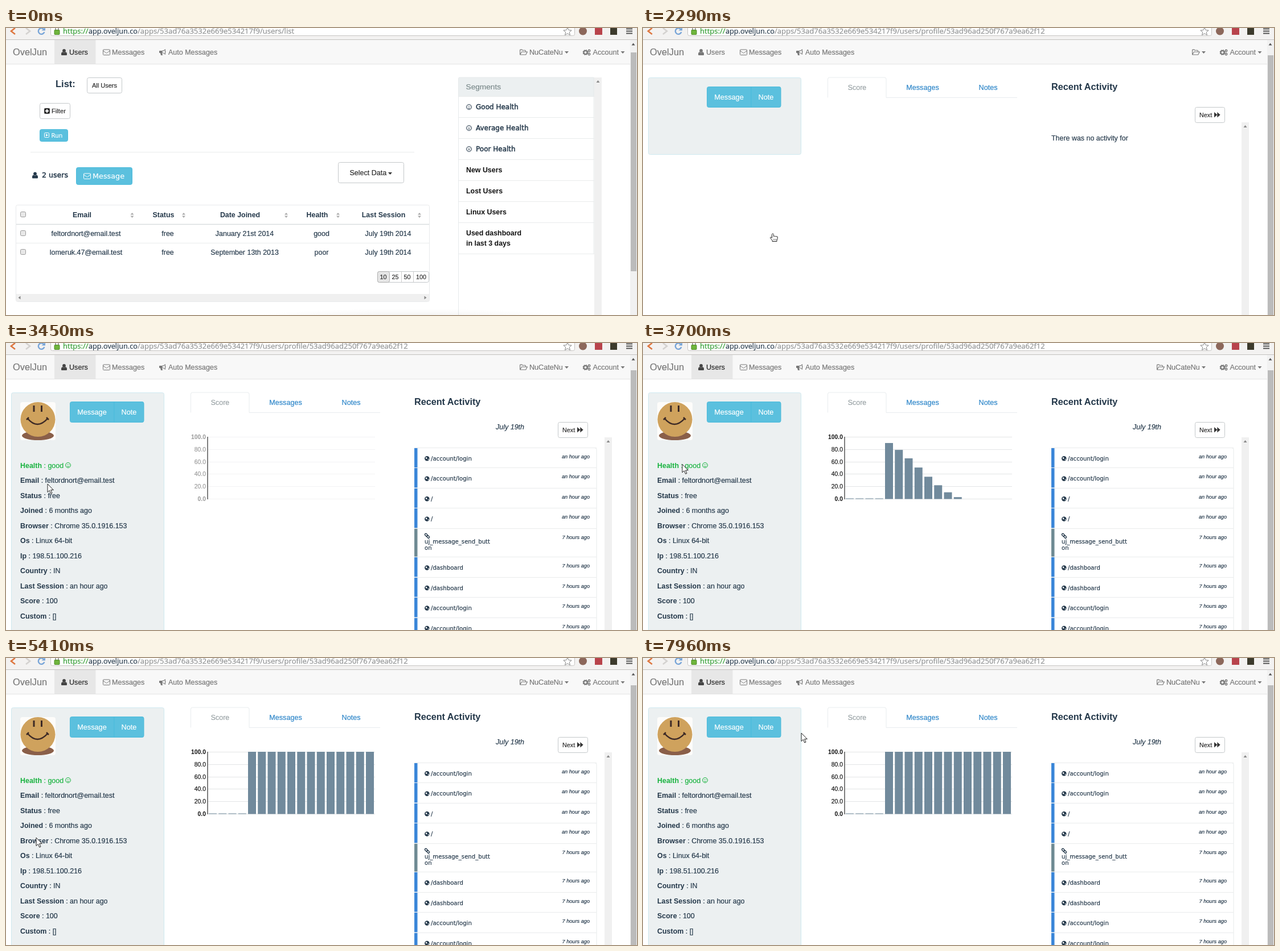
Recreate the animation shown at these times as an HTML page. Size 1108x505 px, loop 8 s.

```html
<!DOCTYPE html>
<html lang="en">
<head>
<meta charset="utf-8">
<title>User profile walkthrough</title>
<style>
html, body { margin: 0; width: 100%; height: 100%; overflow: hidden; background: #fff; }
svg { display: block; width: 100%; height: 100%; }
text { font-family: "Liberation Sans", Arial, sans-serif; white-space: pre;
  color: #24384a; fill: currentColor; stroke: currentColor; stroke-width: .18px; }
.d { font-family: "DejaVu Sans", sans-serif; }
.u { font-family: "Open Sans", sans-serif; }
.b { font-weight: bold; stroke-width: 0; }
.h { stroke-width: .45px; }
.i { font-style: italic; }
.m { text-anchor: middle; }
.e { text-anchor: end; }
.nav { color: #777; }
.dark { color: #2b2b2b; }
.black { color: #111; }
.white { color: #fff; }
.blue { color: #2a84c8; }
.pale { color: #98a1a4; }
.slate { color: #7b8a8b; }
.grey { color: #8e9091; }
.green { color: #18b33f; }
.lock { color: #2d9a2d; }
</style>
</head>
<body>
<svg id="stage" viewBox="0 0 1108 505"></svg>
<script>
const LOOP = 8000;
const ink = '#24384a', cyan = '#5bc0de', cyanEdge = '#4cbbdb', blue = '#3a86d8';

// Drawing helpers
const text = (x, y, s, cls = '', size = 12.45) =>
  `<text x="${x}" y="${y}" class="${cls}" style="font-size:${size}px">${s}</text>`;
const rect = (x, y, w, h, fill, stroke = 'none', r = 0) =>
  `<rect x="${x}" y="${y}" width="${w}" height="${h}" rx="${r}" fill="${fill}" stroke="${stroke}"/>`;
const path = (d, fill = 'none', stroke = 'none', w = 1) =>
  `<path d="${d}" fill="${fill}" stroke="${stroke}" stroke-width="${w}"/>`;
const hline = (x, y, x2, c = '#e9ebec') => path(`M${x} ${y}H${x2}`, 'none', c);
const at = (x, y, s) => `<g transform="translate(${x} ${y})">${s}</g>`;
const group = (id, s) => `<g id="${id}">${s}</g>`;
const button = (x, y, w, h, fill = '#fff', edge = '#c4c8ca') => rect(x + .5, y + .5, w, h, fill, edge, 3);
const range = (n, f) => Array.from({ length: n }, (_, i) => f(i)).join('');

// Icons, placed by their top left corner
const icon = {
  user: (x, y, c) => at(x, y, `<circle cx="5" cy="3" r="2.9" fill="${c}"/>` +
    path('M0 11V8.5Q0 5.5 2.5 5.3Q5 7 7.5 5.3Q10 5.5 10 8.5V10Q10 11 9 11H1Q0 11 0 10Z', c)),
  mail: (x, y, c) => at(x, y, rect(.5, .5, 12, 9.5, 'none', c, 1) + path('M.7 2.5L5.5 6.2Q6.5 7 7.5 6.2L12.3 2.5', 'none', c)),
  horn: (x, y, c) => at(x, y, path('M0 4Q0 3 1 3H5Q8 3 11 0V10Q8 7 5 7L6 11H3L2 7H1Q0 7 0 6ZM11.5 4q1.5 1 0 2z', c) +
    path('M5.5 4Q8 4 10 2V8Q8 6.3 5.5 6Z', '#f8f8f8')),
  folder: (x, y, c) => at(x, y, path('M.6 9V1.5Q.6 .6 1.5 .6H4L5 1.8H9.5Q10.5 1.8 10.5 3V4M.7 9.3L3.5 4.5H13.3L10.8 9.5H1Z', 'none', c, 1.1)),
  cogs: (x, y, c) => at(x, y, `<g fill="none" stroke="${c}" stroke-width="1.5"><circle cx="4.5" cy="6" r="3" stroke-width="2"/>
    <circle cx="4.5" cy="6" r="4.2" stroke-dasharray="1.9 1.4"/>
    <circle cx="11" cy="3" r="1.7"/><circle cx="11" cy="9" r="1.7"/></g>`),
  caret: (x, y, c) => path(`M${x} ${y}h7l-3.5 4z`, c),
  face: (x, y, bend, c = ink) => at(x, y, `<circle cx="5" cy="5" r="4.5" fill="none" stroke="${c}"/>` +
    path('M3 3h1.2v1.3H3zM6 3h1.2v1.3H6z', c) +
    path(`M2.7 ${6.7 - bend * .3}Q5 ${6.7 + bend * 2.2} 7.3 ${6.7 - bend * .3}`, 'none', c)),
  globe: (x, y) => at(x, y, `<circle cx="4.3" cy="4.3" r="4.2" fill="${ink}"/>` +
    path('M1.5 2.5L4 2 4.5 4 2.8 5.5zM5.5 5.5L7.5 4.5 6.5 7.2z', '#fff')),
  link: (x, y) => at(x, y, `<g fill="none" stroke="${ink}" stroke-width="1.4" transform="rotate(45 4.5 4.5)">` +
    '<rect x="-.5" y="2.8" width="5.2" height="3.4" rx="1.7"/><rect x="4.3" y="2.8" width="5.2" height="3.4" rx="1.7"/></g>'),
  sort: (x, y) => path(`M${x - 3} ${y - 1}h6l-3-3.5zM${x - 3} ${y + 1}h6l-3 3.5z`, '#aaa'),
  check: (x, y) => rect(x - 4.5, y - 4.5, 9, 9, '#e8e8e8', '#999', 2),
  up: (x, y) => path(`M${x - 3} ${y + 2}h6l-3-4z`, '#888')
};

const browser = () => rect(0, 0, 1108, 20, '#f3f2f1') + rect(78.5, -9.5, 920, 23, '#fff', '#c6c4c2', 3) +
  hline(0, 20.5, 1108, '#c3c1bf') +
  path('M16 0L9 5.5 16 11', 'none', '#de7740', 2.6) + path('M35 0L42 5.5 35 11', 'none', '#d4d2d0', 2.6) +
  path('M66.5 2.5A5.3 5.3 0 1 0 67.3 7', 'none', '#78a5d8', 2.4) + path('M62.5 4.5h6.5V-1z', '#78a5d8') +
  rect(85, 3.5, 9, 8, '#6fb53c', '#4f8a2a', 1) + path('M87 3V1.5a2.5 2.5 0 0 1 5 0V3', 'none', '#888', 1.5) +
  text(100, 10, 'https://', 'u lock', 13.1) + text(145, 10, 'app.oveljun.co', 'u', 12.7) +
  '<text id="url" class="u grey" x="231" y="10" style="font-size:13.05px"></text>' +
  path('M986 -1l2 4.7 5.2 .4-4 3.3 1.3 5-4.5-2.7-4.5 2.7 1.3-5-4-3.3 5.2-.4z', '#fff', '#888') +
  '<circle cx="1013" cy="5.5" r="7" fill="#8c675a"/>' + rect(1034, 0, 13, 12, '#b8434b') + rect(1061, 0, 12, 12, '#3c3a2c') +
  path('M1089 1.5h11M1089 5.5h11M1089 9.5h11', 'none', '#555', 2);

const nav = () => rect(0, 21, 1096, 42, '#f8f8f8') + hline(0, 63.5, 1096, '#e4e4e4') +
  text(12, 48, 'OvelJun', 'nav', 16.4) +
  group('usersOn', rect(85, 21, 72.5, 42, '#e7e7e7') + icon.user(97, 37, '#444') + text(111, 47, 'Users', 'dark', 12.6)) +
  group('usersOff', icon.user(97, 37, '#777') + text(111, 47, 'Users', 'nav', 12.6)) +
  icon.mail(170, 37.5, '#777') + text(186, 47, 'Messages', 'nav', 12.6) +
  icon.horn(269, 37, '#777') + text(285, 47, 'Auto Messages', 'nav', 12.5) +
  group('appOn', icon.folder(902, 37.5, '#777') + text(919, 47, 'NuCateNu', 'nav', 12.6)) +
  group('appOff', icon.folder(964, 37.5, '#777')) +
  icon.caret(981, 41, '#777') + icon.cogs(1013, 37, '#777') + text(1030.5, 47, 'Account', 'nav', 12.6) + icon.caret(1079.5, 41, '#777');

const column = (x, sortX, head, a, b, dx) => text(x, 333, head, 'b m', 12.4) + icon.sort(sortX, 329.5) +
  text(x + dx, 366, a, 'm') + text(x + dx, 399, b, 'm');

const listPage = () =>
  text(87, 104, 'List:', 'b', 16.5) + button(142, 87, 61, 27) + text(151, 105, 'All Users', 'dark', 11) +
  button(59, 132, 53, 27) + rect(67, 141, 10, 10, '#333', 'none', 2) + path('M72 143v6M69 146h6', 'none', '#fff', 2) +
  text(80, 150, 'Filter', 'dark', 11.2) +
  button(59, 178, 49, 21, cyan, cyanEdge) + rect(67.5, 184.5, 8, 8, 'none', '#fff', 1) + path('M70 186.3l4 2.2-4 2.2z', '#fff') +
  text(79.5, 193, 'Run', 'd white', 10.3) + hline(43, 218.5, 717) +
  icon.user(46, 253.5, ink) + text(63, 263, '2 users', 'd h', 12.6) +
  button(123, 245, 98, 30, cyan, cyanEdge) + icon.mail(136, 255.5, '#fff') + text(152, 265, 'Message', 'd white', 12.8) +
  button(583, 236, 115, 36) + text(603.5, 259, 'Select Data', 'dark', 12.5) + icon.caret(671, 254, '#333') +
  rect(17.5, 311.5, 726, 170, '#fff', '#e8eaeb', 3) +
  group('row0', rect(18, 346, 725, 32, '#ecf0f1')) + group('row1', rect(18, 379, 725, 32, '#ecf0f1')) +
  path('M18 345.5H743', 'none', '#d9dddf', 1.5) + hline(18, 378.5, 743) +
  [328, 361, 394].map(y => icon.check(30, y)).join('') +
  column(133.5, 221.5, 'Email', 'feltordnort@email.test', 'lomeruk.47@email.test', 7) +
  column(276.5, 312, 'Status', 'free', 'free', 7.5) +
  column(411, 492, 'Date Joined', 'January 21st 2014', 'September 13th 2013', 8) +
  column(546.5, 583, 'Health', 'good', 'poor', 7.5) +
  column(663, 726, 'Last Session', 'July 19th 2014', 'July 19th 2014', 8) +
  button(652, 428, 90, 19) + rect(652.5, 428.5, 21, 19, '#e6e6e6', '#adadad', 3) +
  path('M694.5 429v18M715.5 429v18', 'none', '#ccc') +
  [[662.5, 10], [683.5, 25], [704.5, 50], [729, 100]].map(([x, n]) => text(x, 442, n, 'm dark', 10.8)).join('') +
  rect(18, 468, 725, 13, '#f0f0f0') + path('M25.5 471.5v6l-4-3zM734.5 471.5v6l4-3z', '#888') +
  rect(795, 87, 238, 34, '#ecf0f1') + path('M794.5 505V89q0-2 2-2H1032V397.5', 'none', '#e6eaeb') +
  text(807.5, 108, 'Segments', 'slate', 13.7) +
  range(7, i => hline(795, 120.5 + i * 37, 1033)) + hline(795, 397.5, 1033) +
  ['Good', 'Average', 'Poor'].map((s, i) => icon.face(808, 134 + i * 37, 1 - i) + text(825, 143 + i * 37, s + ' Health', 'd h', 12)).join('') +
  ['New Users', 'Lost Users', 'Linux Users', 'Used dashboard'].map((s, i) => text(808, 254 + i * 37, s, 'b black', 12.4)).join('') +
  text(808, 383, 'in last 3 days', 'b black', 12.4) +
  rect(1033, 87, 13, 418, '#f0f0f0') + icon.up(1039.5, 94) +
  '<ellipse cx="710" cy="507" rx="275" ry="13" fill="url(#shade)"/>';

const photo = () => rect(25, 104, 62, 67, '#fdfcfa', 'none', 4) + '<ellipse cx="56" cy="163" rx="28" ry="8" fill="#8a5f49"/>' +
  '<ellipse cx="56" cy="134.5" rx="30.5" ry="30.5" fill="#cfa25d"/>' +
  path('M49 110v11M62.5 110v11', 'none', '#3d2a26', 3) + path('M38 133Q55 153 73 133M36 135l4-4M71 131l4 4', 'none', '#3d2a26', 2.5);

const facts = [['Email', 'feltordnort@email.test'], ['Status', 'free'], ['Joined', '6 months ago'],
  ['Browser', 'Chrome 35.0.1916.153'], ['Os', 'Linux 64-bit'], ['Ip', '198.51.100.216'], ['Country', 'IN'],
  ['Last Session', 'an hour ago'], ['Score', '100'], ['Custom', '[]']];
const fact = ([k, v], y, cls = '') => text(25, y, `<tspan class="b">${k}</tspan> : ${v}`, cls);

const details = () => rect(9.5, 87.5, 268, 430, '#ecf0f1', '#cfe9f0', 3) + photo() +
  fact(['Health', 'good'], 219.5, 'green') + icon.face(104, 210, 1, '#18b33f') +
  facts.map((f, i) => fact(f, 246 + i * 26.5)).join('');

const chart = () => group('axis',
  range(6, i => hline(354, Math.round(165 + i * 21.8) + .5, 648, '#e3e5e6') +
    text(351, 169 + i * 21.8, (100 - i * 20) + '.0', 'e black' + (i % 5 ? '' : ' b'), 10.35))) +
  path('M354 165V275', 'none', '#555', 1.5) +
  range(17, i => `<rect class="bar" x="${356 + i * 17.25}" width="14" fill="#718a9c"/>`);

const visits = ['/account/login', '/account/login', '/', '/', '', '/dashboard', '/dashboard', '/account/login', '/account/login'];
const activity = () => text(860, 152, 'July 19th', 'i', 12.5) + path('M720 184.5H1034q3 0 3 3V505', 'none', '#e6eaeb') +
  visits.map((s, i) => {
    const y = 184 + i * 35.45 + (i > 4 ? 15 : 0);
    return rect(717, y, 5.5, s ? 35 : 50, s ? blue : '#6f8b93') + hline(717, Math.round(y) + .5, 1037) +
      (s ? icon.globe(735, y + 15) + text(746, y + 23, s, 'd', 10.15)
        : icon.link(735, y + 9) + text(735, y + 27.5, 'uj_message_send_butt', 'd', 10.15) + text(735, y + 38, 'on', 'd', 10.15)) +
      text(1025, y + 19, i < 4 ? 'an hour ago' : '7 hours ago', 'e i', 9.2);
  }).join('');

const leftHalf = 'M190 103.5H115.5q-3 0-3 3v30q0 3 3 3H190z', rightHalf = 'M190 103.5H239q3 0 3 3v30q0 3-3 3H190z';
const profilePage = () =>
  group('blank', rect(9.5, 87.5, 268, 135, '#ecf0f1', '#cfe9f0', 3)) + group('details', details()) +
  `<path id="msg" d="${leftHalf}" stroke="${cyanEdge}"/><path id="note" d="${rightHalf}" stroke="${cyanEdge}"/>` +
  text(151, 126, 'Message', 'm white', 12.7) + text(216, 126, 'Note', 'm white', 12.7) +
  path('M324.5 122.5V90q0-3 3-3H424q3 0 3 3v32.5H657', 'none', '#e8ecee') +
  text(376, 109, 'Score', 'm pale') + text(491, 109, 'Messages', 'm blue', 12.6) + text(606, 109, 'Notes', 'm blue', 12.6) +
  text(717, 109, 'Recent Activity', 'b', 16.2) +
  button(969, 139, 52, 27) + text(977, 157, 'Next', 'dark', 10.8) + path('M1003 148l5.3 4.7-5.3 4.7zM1008.3 148l5.3 4.7-5.3 4.7z', '#333') +
  rect(1051, 166, 13, 339, '#f0f0f0') + icon.up(1057.5, 173) +
  group('idle', text(717, 198, 'There was no activity for<tspan id="who"> feltordnort</tspan>')) +
  group('loaded', chart() + activity());

const pageScroll = () => rect(1096, 21, 12, 484, '#f1f1f1') + path('M1098.5 30.5h6l-3-4z', '#555') +
  '<rect id="thumb" x="1097" width="10" fill="#bbb"/>';

const pointers = () => group('arrow', path('M0 0V14.5L3.4 11.4 5.7 17 8 16 5.7 10.6H10.3Z', '#fff', '#222')) +
  group('hand', at(-5, -1, path('M4.8 1C3.7 1 3.4 1.8 3.4 2.5V8.2L1.9 7.2C.8 6.7 0 7.6 .6 8.5L4 12.7V14.5H12V12.7L13.2 9.5V6.8' +
    'C13.2 5.4 11.2 5.3 10.9 6.3C10.7 5.2 8.9 5.1 8.6 6.1C8.4 5.1 6.7 5 6.4 5.8V2.5C6.4 1.7 5.9 1 4.8 1Z', '#fff', '#222') +
    path('M6.4 10v2.5M8.6 10v2.5M10.7 10v2.5', 'none', '#555', .8)));

stage.innerHTML = '<defs><radialGradient id="shade"><stop offset="0" stop-color="#000" stop-opacity=".05"/>' +
  '<stop offset="1" stop-color="#000" stop-opacity="0"/></radialGradient></defs>' +
  rect(0, 0, 1108, 505, '#fff') + group('list', listPage()) + group('profile', profilePage()) +
  nav() + browser() + pageScroll() + pointers();

// Pointer path: time, x, y
const track = [[620, 420, 492], [880, 284, 352], [1030, 284, 352], [1340, 228, 362], [3260, 228, 362], [3450, 73, 248],
  [3800, 68, 205], [4050, 65, 192], [4130, 64, 192], [4250, 60, 188], [4510, 44, 207], [4670, 44, 208],
  [4850, 118, 230], [5050, 76, 255], [5230, 40, 285], [5410, 53, 316], [5450, 52, 337], [5490, 52, 341], [5850, 59, 469],
  [6050, 59, 469], [6790, 122, 131], [7000, 122, 131], [7560, 216, 130], [7790, 216, 130], [7960, 278, 132], [8000, 278, 132]];

const clamp = v => Math.max(0, Math.min(1, v));
const ease = v => v * v * (3 - 2 * v);
const $ = id => document.getElementById(id);
const show = (id, on) => $(id).style.display = on ? '' : 'none';
const bars = [...document.querySelectorAll('.bar')];
const base = '/apps/53ad76a3532e669e534217f9/users/';

function pointerAt(t) {
  const k = Math.max(1, track.findIndex(p => p[0] > t));
  const [a, b] = [track[k - 1], track[k]], f = ease(clamp((t - a[0]) / (b[0] - a[0])));
  return [a[1] + (b[1] - a[1]) * f, a[2] + (b[2] - a[2]) * f];
}

function draw(t) {
  const onList = t < 2240, ready = t >= 2930, loaded = t >= 3260;
  const [x, y] = pointerAt(t), visible = t >= 620;
  show('list', onList); show('profile', !onList);
  show('usersOn', onList || ready); show('usersOff', !onList && !ready);
  show('appOn', onList || loaded); show('appOff', !onList && !loaded);
  show('blank', !ready); show('details', ready);
  show('who', ready); show('idle', !loaded); show('loaded', loaded);
  $('url').textContent = base + (t < 2190 ? 'list' : 'profile/53ad96ad250f767a9ea62f12');
  $('thumb').setAttribute('y', onList ? 43 : 48);
  $('thumb').setAttribute('height', onList ? 385 : 457);

  const row = visible && onList ? (y >= 346 && y < 378 ? 0 : y >= 378 && y < 411 ? 1 : -1) : -1;
  show('row0', row === 0); show('row1', row === 1);
  const overButtons = ready && y > 103 && y < 140 && x > 112 && x < 242;
  $('msg').setAttribute('fill', overButtons && x < 190 ? blue : cyan);
  $('note').setAttribute('fill', overButtons && x >= 190 ? blue : cyan);

  $('axis').style.opacity = clamp((t - 3260) / 450);
  bars.forEach((bar, i) => {
    const h = i < 4 ? 1 : 109.5 * ease(clamp((t - 3400 - i * 25) / 250));
    bar.setAttribute('y', 274.5 - h);
    bar.setAttribute('height', t < 3460 ? 0 : h);
  });

  const hand = row >= 0 || overButtons || (!onList && !ready);
  show('hand', visible && hand); show('arrow', visible && !hand);
  $(hand ? 'hand' : 'arrow').setAttribute('transform', `translate(${x} ${y})`);
}

const start = performance.now();
function tick() {
  draw((performance.now() - start) % LOOP);
  requestAnimationFrame(tick);
}
tick();
</script>
</body>
</html>
```
